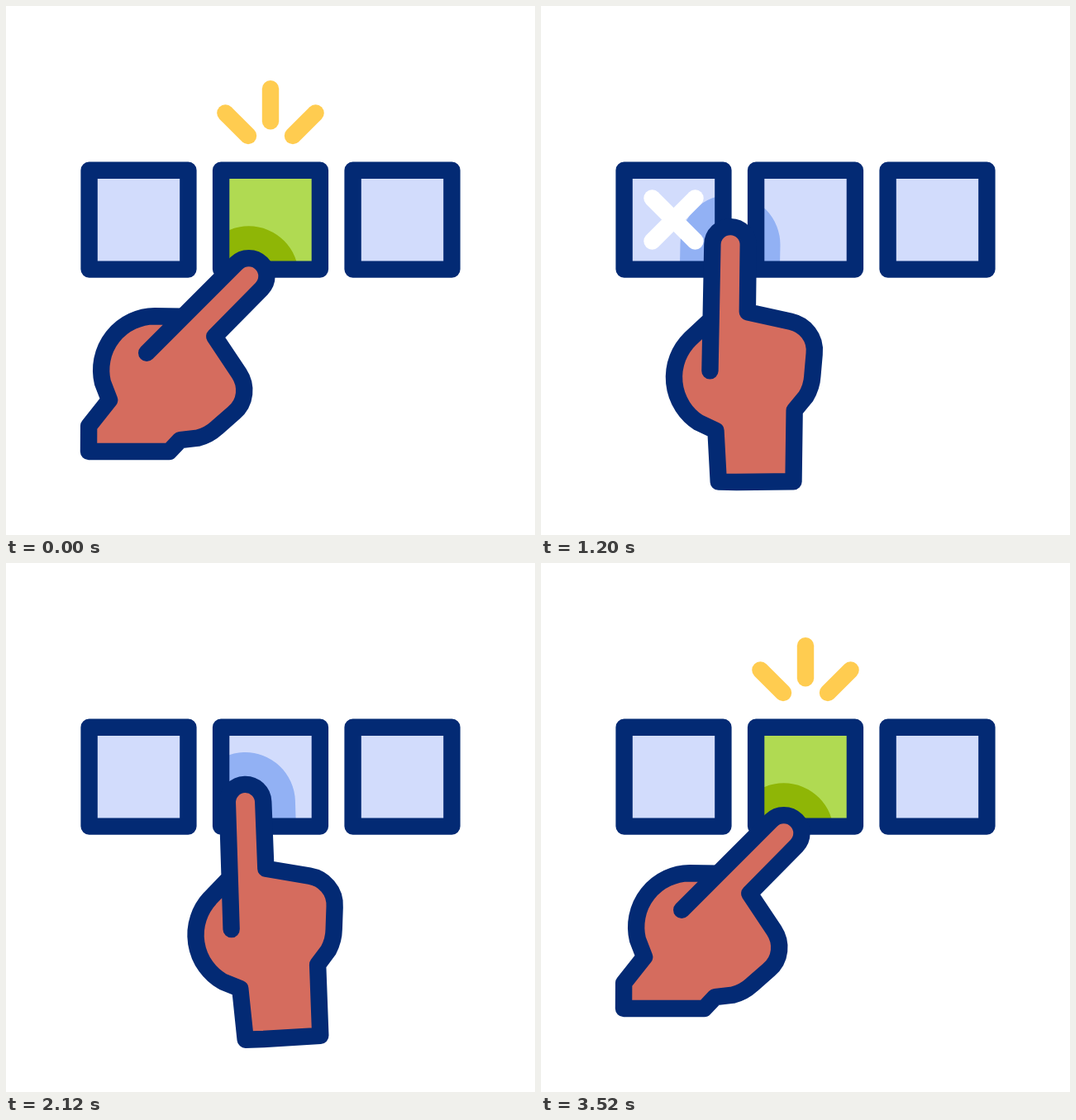
Recreate the animation shown at these times as an HTML page with a canvas. Size 640 by 640 pixels, loop 3.6 s.

```html
<!DOCTYPE html>
<html lang="en">
<head>
<meta charset="utf-8">
<title>Pick the right box</title>
<style>
  html, body { margin: 0; width: 100%; height: 100%; overflow: hidden; background: #fff; }
  canvas { display: block; }
</style>
</head>
<body>
<canvas id="stage" width="640" height="640"></canvas>
<script>
const ctx = document.getElementById('stage').getContext('2d');
const LOOP = 3600, STEP = 200, LINE = 20.4, SIDE = 119.8, TOP = 198.8;
const NAVY = '#032a74', SKIN = '#d56c5e', YELLOW = '#ffcc50', WHITE = '#fff';
const PALE = [210, 220, 252], BLUE = [146, 177, 244];
const GREEN = [176, 218, 82], DARK_GREEN = [143, 182, 6];
let t = 0;

const clamp = (v, lo, hi) => Math.min(hi, Math.max(lo, v));
const mix = (a, b, k) => `rgb(${a.map((v, i) => Math.round(v + (b[i] - v) * k))})`;

// Smooth 0 to 1 over a stretch of the loop.
function ease(start, length = STEP) {
  const u = clamp((t - start) / length, 0, 1);
  return u * u * (3 - 2 * u);
}

// A line that grows from its first end at time on, then is wiped away at time off.
function growLine(x, y, dx, dy, on, off, color = WHITE, length = STEP) {
  const head = ease(on, length), tail = ease(off);
  if (head <= tail) return;
  ctx.beginPath();
  ctx.moveTo(x + dx * tail, y + dy * tail);
  ctx.lineTo(x + dx * head, y + dy * head);
  ctx.strokeStyle = color;
  ctx.stroke();
}

// 1 while the hand rests leaning to the left, 0 while it stands upright.
const lean = () => 1 - ease(0, 600) + ease(2600, 800);

// The hand turns about a corner of its cuff; its own origin is the fingertip.
function placeHand() {
  const toFirst = 60.5, toMiddle = 151;
  const x = 100 + toFirst * ease(0, 600) + toMiddle * ease(1000, 400)
    - (toFirst + toMiddle) * ease(2600, 800);
  const swing = -3.7 * Math.cos(Math.PI * clamp((t - 1600) / STEP, 0, 2))
    * (ease(1400) - ease(2000, 400));
  ctx.translate(x, 576 - 37 * lean());
  ctx.rotate((1.1 + 43.9 * lean() + swing) * Math.PI / 180);
  ctx.translate(-13.1, -287);
}

function drawHand() {
  const hand = new Path2D(`M-21.6 153V0A21.7 21.7 0 0 1 21.8 0L22.4 81L75 91.5
    C92 95 106 110 104.2 130L102.4 157C102 167 99 175 95 182L81.5 199
    L82 ${285 - 67 * lean()}L13.1 287L-8.7 ${287 - 22 * lean()}L-13.2 225.2
    L-34 216A65.3 65.3 0 0 1 -46.3 114.8L-21.8 91`);
  ctx.save();
  placeHand();
  ctx.fillStyle = SKIN;
  ctx.fill(hand);
  ctx.strokeStyle = NAVY;
  ctx.stroke(hand);
  ctx.restore();
}

function drawShadow(color) {
  ctx.save();
  placeHand();
  ctx.lineWidth = 121;
  ctx.beginPath();
  ctx.moveTo(0, 0);
  ctx.lineTo(0, 150);
  ctx.strokeStyle = color;
  ctx.stroke();
  ctx.restore();
}

function drawCross() {
  for (const side of [-1, 1])
    growLine(160.5 - 26 * side, 232.5, 52 * side, 52, side < 0 ? 800 : 600, 1800);
}

function drawTick() {
  growLine(288, 253, 25, 25, 2200, 3200, WHITE, STEP / 2);
  growLine(313, 278, 39, -39, 2300, 3200, WHITE, STEP / 2);
}

function drawRays(on, off) {
  for (const side of [-1, 0, 1]) {
    const angle = side * Math.PI / 4;
    growLine(320 + 27 * side, 139.3 + 17.7 * Math.abs(side),
      39 * Math.sin(angle), -39 * Math.cos(angle), on, off, YELLOW);
  }
}

function drawBox(i) {
  const x = 320 + 159.5 * (i - 1) - SIDE / 2;
  const correct = i === 1 ? 1 - ease(0) + ease(2200) : 0;
  const pressed = i === 0 ? ease(600) - ease(800) : 0;
  ctx.save();
  ctx.beginPath();
  ctx.rect(x, TOP, SIDE, SIDE);
  ctx.clip();
  ctx.fillStyle = correct ? mix(PALE, GREEN, correct) : mix(PALE, BLUE, pressed);
  ctx.fillRect(x, TOP, SIDE, SIDE);
  drawShadow(mix(BLUE, DARK_GREEN, correct));
  ctx.restore();
  if (i === 0) drawCross();
  if (i === 1) drawTick();
  ctx.strokeStyle = NAVY;
  ctx.strokeRect(x, TOP, SIDE, SIDE);
}

function draw() {
  ctx.fillStyle = WHITE;
  ctx.fillRect(0, 0, 640, 640);
  ctx.lineWidth = LINE;
  ctx.lineCap = ctx.lineJoin = 'round';
  drawRays(-STEP, 0);
  drawRays(2400, 2600);
  drawRays(3320, LOOP);
  for (let i = 0; i < 3; i++) drawBox(i);
  drawHand();
}

const start = performance.now();
function tick() {
  t = (performance.now() - start) % LOOP;
  draw();
  requestAnimationFrame(tick);
}
tick();
</script>
</body>
</html>
```
